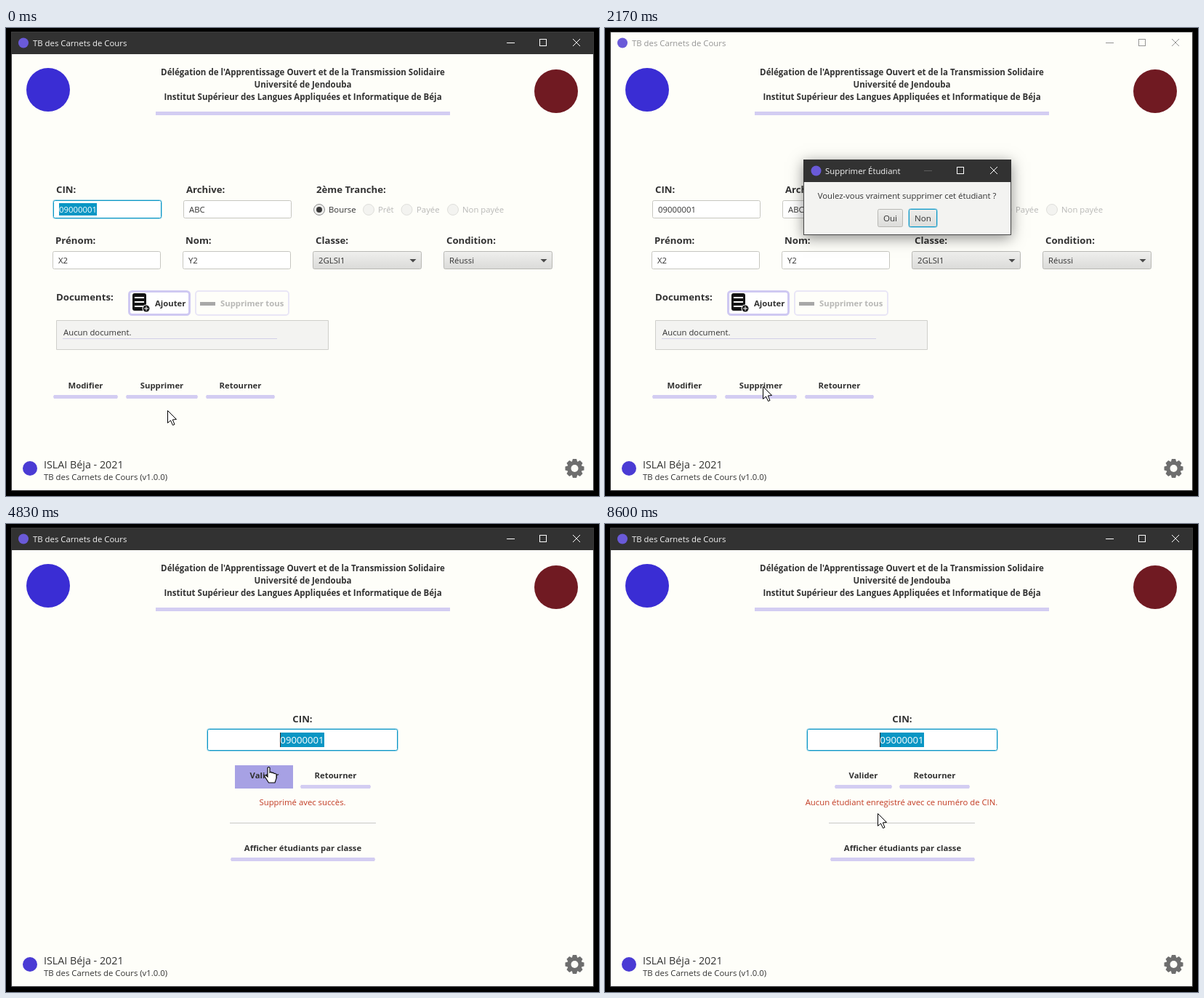
Animation, 816 px wide and 644 px high, one loop 8630 ms. Source, as an HTML page with a canvas:

```html
<!DOCTYPE html>
<html lang="fr">
<head>
<meta charset="utf-8">
<style>
  html, body { margin: 0; width: 100%; height: 100%; overflow: hidden; background: #000; }
  canvas { display: block; }
</style>
</head>
<body>
<canvas id="stage" width="816" height="644"></canvas>
<script>
const ctx = document.getElementById('stage').getContext('2d');
const LOOP = 8630;
const INK = '#323232', PAPER = '#fefef9', BAR = '#d3cdf2', EDGE = '#c6c6c0', HOVER = '#a7a1e4';
const BLUE = '#0a96c4', DIM = '#b8b8b6', TITLE_BAR = '#323232', PANEL = '#f3f3f1';
const APP = 'TB des Carnets de Cours';

// Key moments, in ms
const DIALOG_IN = 1700, DIALOG_OUT = 3600, NOT_FOUND = 5750;
const CLICKS = [1300, 3330, 5600], RING_LIFE = 430;

// Pointer path: time, x, y
const PATH = [
  [0, 222, 526], [700, 222, 526], [1000, 214, 497], [2100, 214, 497],
  [2970, 388, 264], [3070, 388, 264], [3100, 383, 265], [4430, 383, 265],
  [4830, 361, 334], [5170, 355, 345], [7700, 355, 345], [8430, 375, 398], [LOOP, 375, 398]
];

const clamp = v => Math.max(0, Math.min(1, v));
const smooth = v => v * v * (3 - 2 * v);

function pointerAt(t) {
  const i = PATH.findIndex((key, n) => n > 0 && t <= key[0]);
  const [t0, x0, y0] = PATH[i - 1], [t1, x1, y1] = PATH[i];
  const p = smooth((t - t0) / (t1 - t0));
  return { x: Math.round(x0 + (x1 - x0) * p), y: Math.round(y0 + (y1 - y0) * p) };
}

const inside = (p, x, y, w, h) => p.x >= x && p.x <= x + w && p.y >= y && p.y <= y + h;

function text(str, x, y, { size = 11.35, bold = false, color = INK, align = 'left' } = {}) {
  ctx.font = `${bold ? 'bold ' : ''}${size}px "Open Sans", "Noto Sans", sans-serif`;
  ctx.fillStyle = color;
  ctx.textAlign = align;
  ctx.fillText(str, x, y);
}

const boldText = (str, x, y, opts) => text(str, x, y, { size: 11.3, bold: true, ...opts });
const label = (str, x, y, align) => boldText(str, x, y, { size: 13.2, align });

function rect(x, y, w, h, color) {
  ctx.fillStyle = color;
  ctx.fillRect(x, y, w, h);
}

function box(x, y, w, h, { fill = '#fff', stroke = EDGE, line = 1, r = 2 } = {}) {
  ctx.beginPath();
  ctx.roundRect(x + line / 2, y + line / 2, w - line, h - line, r);
  ctx.fillStyle = fill;
  ctx.fill();
  ctx.strokeStyle = stroke;
  ctx.lineWidth = line;
  ctx.stroke();
}

function circle(x, y, r, color) {
  ctx.beginPath();
  ctx.arc(x, y, r, 0, 7);
  ctx.fillStyle = color;
  ctx.fill();
}

function polygon(points, x, y, fill, stroke) {
  ctx.beginPath();
  points.forEach(([dx, dy]) => ctx.lineTo(x + dx, y + dy));
  ctx.closePath();
  ctx.fillStyle = fill;
  ctx.fill();
  if (stroke) {
    ctx.strokeStyle = stroke;
    ctx.lineWidth = 1;
    ctx.stroke();
  }
}

function vertical(y, h, top, bottom) {
  const g = ctx.createLinearGradient(0, y, 0, y + h);
  g.addColorStop(0, top);
  g.addColorStop(1, bottom);
  return g;
}

function field(value, x, y) {
  box(x, y, 149, 25);
  text(value, x + 8, y + 17);
}

// Blue outline with a faint halo one pixel outside it
function focusBox(x, y, w, h, fill) {
  box(x - 1, y - 1, w + 2, h + 2, { fill, stroke: '#a5d8ea', r: 3 });
  box(x, y, w, h, { fill, stroke: BLUE });
}

function combo(value, x, y) {
  box(x, y, 150, 25, { fill: vertical(y, 25, '#f0f0ee', '#dadad8'), stroke: '#b8b8b4' });
  text(value, x + 8, y + 17);
  polygon([[0, 0], [9, 0], [4.5, 4.5]], x + 133.5, y + 11, '#4a4a4a');
}

function radio(name, x, textX, selected) {
  ctx.beginPath();
  ctx.arc(x, 250, 7.5, 0, 7);
  ctx.fillStyle = selected ? '#ededeb' : '#f3f3f0';
  ctx.fill();
  ctx.strokeStyle = selected ? '#8c8c8c' : '#dfdfdb';
  ctx.lineWidth = 1;
  ctx.stroke();
  if (selected) circle(x, 250, 4, '#383838');
  text(name, textX, 254, { color: selected ? INK : DIM });
}

const bar = (x, y, w) => polygon([[1, 0], [w - 1, 0], [w, 2.5], [w - 1, 5], [1, 5], [0, 2.5]], x, y, BAR);

function flatButton(name, x, y, w, hovered) {
  if (hovered) rect(x - 1, y, w + 1, 32, HOVER);
  else bar(x, y + 27, w);
  boldText(name, x + w / 2, y + 18, { align: 'center' });
}

function windowIcons(x, y, color, minColor = color) {
  rect(x, y, 11, 1, minColor);
  ctx.strokeStyle = color;
  ctx.lineWidth = 1;
  ctx.strokeRect(x + 45.5, y - 4.5, 9, 9);
  ctx.beginPath();
  ctx.moveTo(x + 91, y - 5);
  ctx.lineTo(x + 101, y + 5);
  ctx.moveTo(x + 101, y - 5);
  ctx.lineTo(x + 91, y + 5);
  ctx.stroke();
}

function gear(x, y) {
  const color = '#6e6e6e';
  ctx.save();
  ctx.translate(x, y);
  for (let i = 0; i < 8; i++) {
    polygon([[-4, -8], [-2.6, -13], [2.6, -13], [4, -8]], 0, 0, color);
    ctx.rotate(Math.PI / 4);
  }
  circle(0, 0, 10, color);
  circle(0, 0, 5, PAPER);
  ctx.restore();
}

function frameAndHeader(active) {
  rect(0, 0, 816, 644, '#000');
  rect(7, 5, 802, 632, '#3c3c3c');
  rect(8, 6, 800, 630, PAPER);
  if (active) rect(8, 6, 800, 30, TITLE_BAR);
  circle(24, 20.5, 7, '#6a5ad8');
  text(APP, 37, 25, { color: active ? '#f4f4f4' : '#949494' });
  windowIcons(689, 20, active ? '#fff' : '#949494');

  circle(58, 85, 30, '#3a2dd4');
  circle(757, 87, 30, '#701a22');
  const centered = { size: 11.53, align: 'center' };
  boldText("Délégation de l'Apprentissage Ouvert et de la Transmission Solidaire", 408.5, 65, centered);
  boldText('Université de Jendouba', 408.5, 82, centered);
  boldText('Institut Supérieur des Langues Appliquées et Informatique de Béja', 408.5, 99, centered);
  rect(206, 115, 405, 5, BAR);

  circle(33, 606, 10, '#4a3bd4');
  text('ISLAI Béja - 2021', 52, 606, { size: 14.3 });
  text(APP + ' (v1.0.0)', 52, 622);
  gear(782.5, 606);
}

function documentIcon() {
  const black = '#141414';
  ctx.beginPath();
  ctx.roundRect(174, 365, 19, 24, 3);
  ctx.fillStyle = black;
  ctx.fill();
  for (const y of [370, 376, 382]) rect(177, y, 13, 2, '#fff');
  circle(193, 386, 5.5, '#fff');
  circle(193, 386, 4.5, black);
  rect(190, 385.5, 6, 1, '#fff');
  rect(192.5, 383, 1, 6, '#fff');
}

function studentPage(pointer, active) {
  label('CIN:', 69, 227);
  label('Archive:', 248, 227);
  label('2ème Tranche:', 427, 227);
  if (active) {
    focusBox(65, 237, 149, 25);
    rect(73, 241, 52, 17, BLUE);
    text('09000001', 73, 254, { color: '#fff' });
  } else {
    field('09000001', 65, 237);
  }
  field('ABC', 244, 237);
  radio('Bourse', 431, 444, true);
  radio('Prêt', 499, 512);
  radio('Payée', 551.5, 565);
  radio('Non payée', 615, 628);

  label('Prénom:', 68, 297);
  label('Nom:', 247, 297);
  label('Classe:', 426, 297);
  label('Condition:', 606, 297);
  field('X2', 64, 307);
  field('Y2', 243, 307);
  combo('2GLSI1', 422, 307);
  combo('Réussi', 602, 307);

  label('Documents:', 69, 375);
  box(168, 361, 86, 35, { stroke: '#cfc9f2', line: 3, r: 4 });
  documentIcon();
  boldText('Ajouter', 205, 383);
  box(260, 361, 130, 35, { fill: PAPER, stroke: '#e9e6f6', line: 2, r: 4 });
  rect(267, 377, 21, 5, '#a8a8a8');
  boldText('Supprimer tous', 295, 383, { color: DIM });

  box(69, 402, 375, 41, { fill: PANEL, stroke: '#cfcfcb', r: 0 });
  text('Aucun document.', 79, 423);
  rect(78, 427, 295, 1, '#d2cfe8');

  flatButton('Modifier', 65, 478, 89);
  flatButton('Supprimer', 165, 478, 99, active && inside(pointer, 164, 478, 100, 32));
  flatButton('Retourner', 275, 478, 95);
}

function searchPage(t, pointer) {
  const missing = t >= NOT_FOUND, dx = missing ? 1 : 0;
  label('CIN:', 408 + dx, 273, 'center');
  focusBox(277 + dx, 282, 262, 30);
  rect(377 + dx, 287, 61, 20, BLUE);
  text('09000001', 407.5 + dx, 302, { size: 13.2, color: '#fff', align: 'center' });
  const caretOn = Math.floor((t - 3600) / 500) % 2 === 0;
  if (caretOn) rect(377 + dx, 287, 1, 20, INK);

  flatButton('Valider', 316, 332, 79, inside(pointer, 315, 332, 80, 32));
  flatButton('Retourner', 405, 332, 97);
  text(missing ? 'Aucun étudiant enregistré avec ce numéro de CIN.' : 'Supprimé avec succès.',
    408, 387, { color: '#c23a22', align: 'center' });
  rect(308, 411, 201, 1, '#c8c8c8');
  flatButton('Afficher étudiants par classe', 309 + dx, 432, 199);
}

function dialogButton(name, x, w, focused) {
  const fill = vertical(249, 25, '#eeeeec', '#dcdcda');
  if (focused) focusBox(x, 249, w, 25, fill);
  else box(x, 249, w, 25, { fill, stroke: '#b8b8b4' });
  text(name, x + w / 2, 266, { size: 11.6, align: 'center' });
}

function dialog(t) {
  const shown = smooth(clamp((t - DIALOG_IN) / 200)) * (1 - smooth(clamp((t - DIALOG_OUT) / 150)));
  if (shown <= 0) return;
  const scale = 0.9 + 0.1 * shown;
  ctx.save();
  ctx.globalAlpha = shown;
  ctx.translate(416, 233);
  ctx.scale(scale, scale);
  ctx.translate(-416, -233);
  ctx.shadowColor = 'rgba(0, 0, 0, .45)';
  ctx.shadowBlur = 18;
  ctx.shadowOffsetY = 4;
  rect(273, 181, 286, 104, '#484848');
  ctx.shadowColor = 'transparent';
  rect(274, 212, 284, 72, PANEL);
  rect(273, 181, 286, 31, TITLE_BAR);
  circle(290.5, 196.5, 7, '#6a5ad8');
  text('Supprimer Étudiant', 303, 201, { color: '#f4f4f4' });
  windowIcons(439, 196, '#fff', '#5c5c5c');
  text('Voulez-vous vraiment supprimer cet étudiant ?', 415.5, 235, { align: 'center' });
  const yesFocused = t >= CLICKS[1];
  dialogButton('Oui', 375, 35, yesFocused);
  dialogButton('Non', 418, 39, !yesFocused);
  ctx.restore();
}

function clickRing(t, { x, y }) {
  const start = CLICKS.find(c => t >= c && t < c + RING_LIFE);
  if (start === undefined) return;
  const age = t - start;
  ctx.beginPath();
  ctx.arc(x, y, 4 + age * 0.046, 0, 7);
  ctx.strokeStyle = `rgba(215, 60, 90, ${0.85 * (1 - age / RING_LIFE)})`;
  ctx.lineWidth = 4;
  ctx.stroke();
}

const ARROW = [[0, 0], [0, 17], [4, 13.5], [7, 20], [9.5, 19], [6.8, 12.5], [12, 12]];

function hand(x, y) {
  ctx.save();
  ctx.translate(x - 6, y);
  const shape = new Path2D('M5 1.5Q6.5-.5 8 1.5V8Q10 6.5 11 8.5Q13 7.5 14 9.5Q16.5 8.5 17 11V16L15 22H6.5L1 13.5Q.5 11 3 12L5 14Z');
  ctx.fillStyle = '#fff';
  ctx.fill(shape);
  ctx.strokeStyle = '#000';
  ctx.lineWidth = 1.1;
  ctx.stroke(shape);
  ctx.restore();
}

function drawPointer(pointer, onSearchPage) {
  const { x, y } = pointer;
  if (onSearchPage && inside(pointer, 315, 332, 80, 32)) {
    hand(x, y);
  } else if (onSearchPage && inside(pointer, 277, 282, 262, 30)) {
    rect(x, y - 8, 1, 16, '#000');
    rect(x - 3, y - 8, 7, 1, '#000');
    rect(x - 3, y + 8, 7, 1, '#000');
  } else {
    polygon(ARROW, x + 0.5, y + 0.5, '#fff', '#000');
  }
}

function draw(t) {
  const pointer = pointerAt(t);
  const onSearchPage = t >= DIALOG_OUT;
  const active = t < DIALOG_IN || onSearchPage;
  frameAndHeader(active);
  if (onSearchPage) searchPage(t, pointer);
  else studentPage(pointer, active);
  dialog(t);
  clickRing(t, pointer);
  drawPointer(pointer, onSearchPage);
}

const begin = performance.now();
function tick() {
  draw((performance.now() - begin) % LOOP);
  requestAnimationFrame(tick);
}
tick();
</script>
</body>
</html>
```
